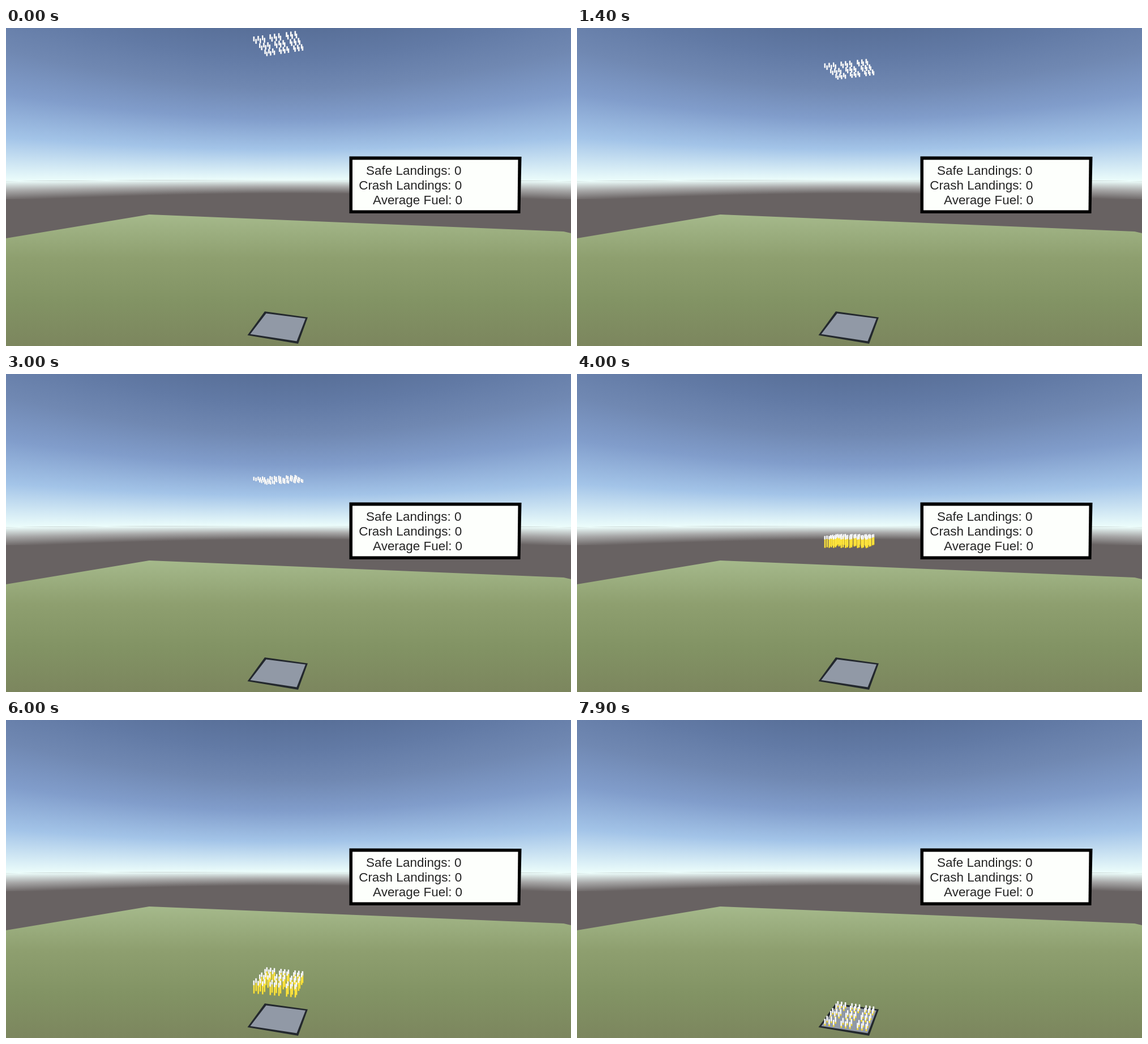
Write an HTML page with a canvas that moves like this. It is 998 px wide and 561 px high and loops after 8000 ms.

```html
<!DOCTYPE html>
<html lang="en">
<head>
<meta charset="utf-8">
<title>Landing test</title>
<style>
html, body { margin: 0; width: 100%; height: 100%; overflow: hidden; background: #686262; }
canvas { position: absolute; left: 0; top: 0; }
</style>
</head>
<body>
<canvas id="scene" width="998" height="561"></canvas>
<canvas id="fleet" width="998" height="561"></canvas>
<script>
const W = 998, H = 561, LOOP = 8000, STEP = 100;
const scene = document.getElementById('scene').getContext('2d');
const fleet = document.getElementById('fleet').getContext('2d');

function poly(color, ...p) {
  scene.fillStyle = color;
  scene.beginPath();
  for (let i = 0; i < p.length; i += 2) scene.lineTo(p[i], p[i + 1]);
  scene.fill();
}

// Colours spread evenly from y0 to y1
function gradient(y0, y1, ...colors) {
  const g = scene.createLinearGradient(0, y0, 0, y1);
  colors.forEach((color, i) => g.addColorStop(i / (colors.length - 1), color));
  return g;
}

function drawSky() {
  // Lines of equal elevation bend away from the horizon towards the sides.
  const horizon = 263, focal = 486;
  const bands = [
    [-263, 5, gradient(-263, 5, '#586f98', '#627aa5', '#7088b2', '#819dcb', '#a3c4e8', '#ecfdfb')],
    [5, 40, gradient(5, 29, '#ecfdfb', '#a8a8a8', '#686262')]
  ];
  for (let x = 0; x < W; x++) {
    scene.setTransform(1, 0, 0, Math.hypot(1, (x - W / 2) / focal), x, horizon);
    for (const [top, bottom, fill] of bands) {
      scene.fillStyle = fill;
      scene.fillRect(0, top, 1, bottom - top);
    }
  }
  scene.resetTransform();
  scene.fillStyle = '#686262';
  scene.fillRect(0, 302, W, H);
}

function drawBoard() {
  poly('#000', 606.5, 226.5, 910.5, 227, 908.5, 327, 606.5, 327);
  poly('#fdfffc', 612, 232.5, 904.5, 232.5, 903.5, 321.5, 612, 321.5);
  scene.fillStyle = '#242424';
  scene.font = '22.45px "Liberation Sans", Arial, sans-serif';
  scene.textAlign = 'right';
  ['Safe Landings: 0', 'Crash Landings: 0', 'Average Fuel: 0'].forEach((line, i) =>
    scene.fillText(line, 804.5 + i * 0.8, 259 + i * 25.8));
}

drawSky();
poly(gradient(329, H, '#a5b98b', '#8e9f6f', '#829364', '#7c865e'),
  0, 371, 253, 329, 985, 359, 998, 362, W, H, 0, H);
poly('#23282d', 457, 500, 533, 510.5, 516, 557, 426.5, 542);
poly('#9199a6', 459.5, 503.5, 529, 512.5, 513.5, 552.5, 431.5, 540);
drawBoard();

// Height of the front left rocket's tip: free fall easing into steady braking
function tipAt(t) {
  const fall = t / 1000, left = (7900 - t) / 1000;
  const falling = 15 + 15 * fall + 13.5 * fall * fall;
  const braking = 527 - 9.6 * left - 13.6 * left * left;
  const s = Math.min(Math.max((fall - 3.3) / 1.2, 0), 1);
  return falling + (braking - falling) * s * s * (3 - 2 * s);
}

const GROUND = 539, FLAME = 15, IGNITION = 3800, GROUPS = 3, COLS = 3, ROWS = 2;

// Position from 0 to 1 of item i in groups of n; pitch is the group distance in item gaps
const place = (i, n, pitch) =>
  (Math.floor(i / n) * pitch + i % n) / ((GROUPS - 1) * pitch + n - 1);
const project = (y, u, v) => y + u * (y - 272) * 0.037 - v * (y - 253) * 0.113;

function bar(color, x, top, width, height) {
  fleet.fillStyle = color;
  fleet.fillRect(x, top, width, height);
}

function drawRocket(tip, t, u, v) {
  const scale = 1 - 0.1 * v;
  const x = 438 + 23 * v + u * (73 - 10 * v);
  const top = project(tip, u, v);
  const size = (5.5 + 0.012 * Math.abs(tip - 253)) * scale, base = top + size;
  if (t >= IGNITION) {
    const end = Math.min(base + FLAME * scale, project(GROUND, u, v));
    bar('#f6d51e', x - 1.3, base - 1, 2.6, end - base + 1);
    bar('#ffee58', x - 0.6, base - 1, 1.2, end - base);
  }
  bar('#c9ced3', x - 1.3, top, 2.6, size);
  bar('#fff', x - 1.3, top, 2, size);
}

function drawFleet(t) {
  const tip = tipAt(t);
  fleet.clearRect(0, 0, W, H);
  for (let row = GROUPS * ROWS - 1; row >= 0; row--) {
    const depth = place(row, ROWS, 2.8), v = depth * 1.12 / (1 + 0.12 * depth);
    for (let col = 0; col < GROUPS * COLS; col++) drawRocket(tip, t, place(col, COLS, 3.77), v);
  }
}

const start = performance.now();
function tick() {
  const t = (performance.now() - start) % LOOP;
  drawFleet(Math.floor(t / STEP) * STEP);
  requestAnimationFrame(tick);
}
tick();
</script>
</body>
</html>
```
